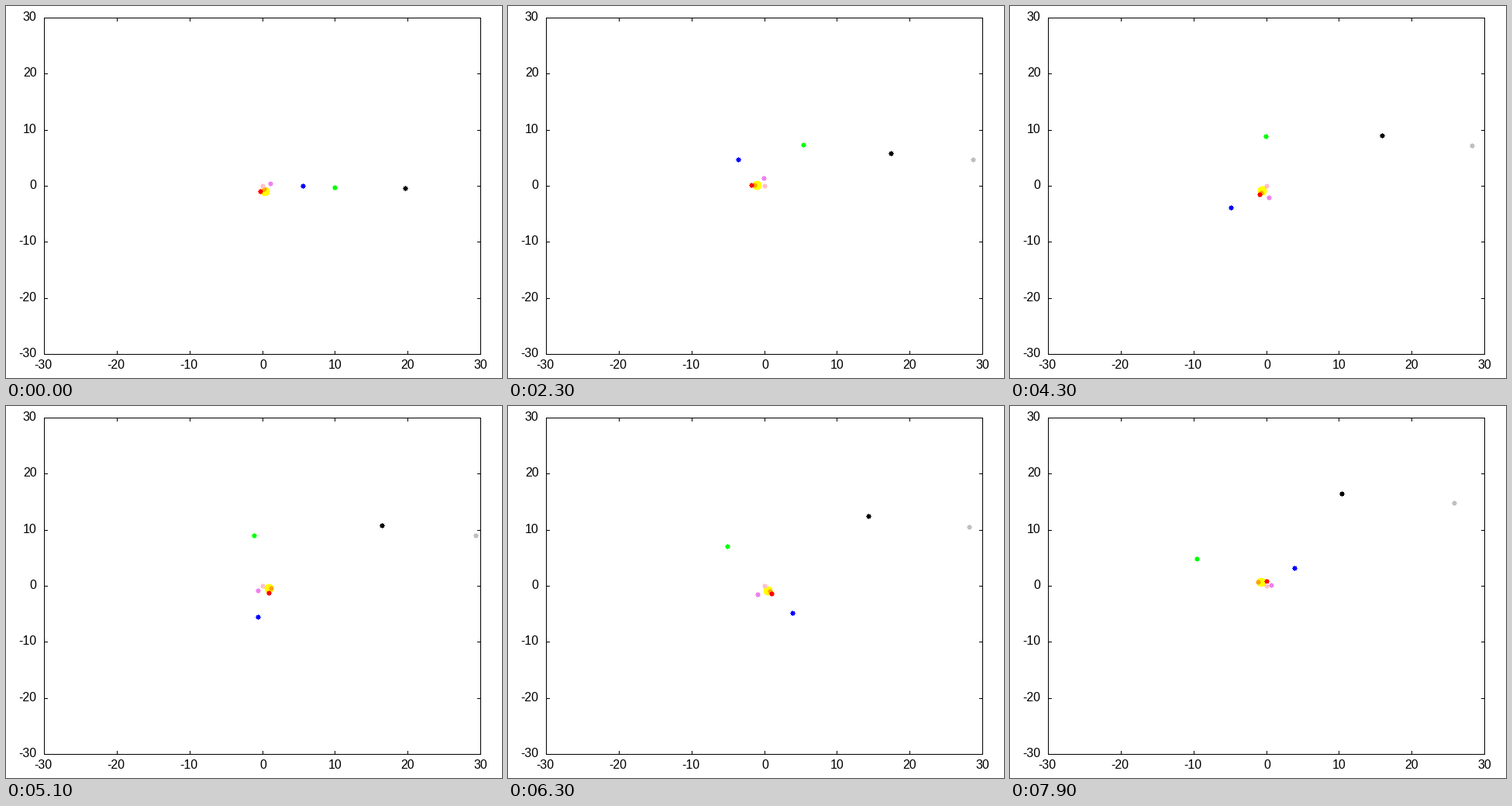
A matplotlib script for the animation above (8 s loop, 640x480 px).

```python
import numpy as np
import matplotlib.pyplot as plt
from matplotlib.animation import FuncAnimation
from matplotlib.patches import Polygon, Rectangle

W, H, DPI = 640, 480, 80
LEFT, RIGHT, TOP, BOTTOM = 49, 612, 15, 449
LIMIT, TICK = 30, 4
FRAMES, START = 80, 2
PX = 72 / DPI  # one pixel in points

SUN_RATE = 57.21  # degrees per step, seen from the fixed centre
# colour, semi-major axis, eccentricity, mean degrees per step
PLANETS = [
    ("#ffa500", 0.387, 0, 237.8),
    ("#ff0000", 0.723, 0, 93.5),
    ("#ffc0cb", 1.0, 0, SUN_RATE),
    ("#ee82ee", 1.515, 0, 30.82),
    ("#0000ff", 5.225, 0.003, 4.797),
    ("#00ff00", 9.65, 0.0115, 1.903),
    ("#000000", 19.22, 0, 0.678),
    ("#c0c0c0", 30.0, 0, 0.344),
]

fig = plt.figure(figsize=(W / DPI, H / DPI), dpi=DPI, facecolor="white")
ax = fig.add_axes([0, 0, 1, 1])
ax.set_xlim(0, W)
ax.set_ylim(H, 0)
ax.axis("off")


def to_px(x, y):
    """Column and row of the pixel that holds a point in plot units."""
    px = LEFT + (x + LIMIT) * (RIGHT - LEFT) / (2 * LIMIT)
    py = BOTTOM - (y + LIMIT) * (BOTTOM - TOP) / (2 * LIMIT)
    return np.floor(px + 0.5), np.floor(py + 0.5)


def bar(x0, y0, x1, y1):
    """One-pixel line covering both end pixels."""
    ax.add_patch(Rectangle((x0, y0), x1 - x0 + 1, y1 - y0 + 1, fc="black",
                           ec="none", lw=0, antialiased=False, zorder=20))


def label(x, y, value, align):
    ax.text(x, y, str(value), family="Liberation Sans", size=16 * PX,
            ha=align, va="baseline", color="black")


def draw_axes():
    for y in (TOP, BOTTOM):
        bar(LEFT, y, RIGHT, y)
    for x in (LEFT, RIGHT):
        bar(x, TOP, x, BOTTOM)
    for v in range(-LIMIT, LIMIT + 1, 10):
        x, y = to_px(v, v)
        bar(x, TOP, x, TOP + TICK)
        bar(x, BOTTOM - TICK, x, BOTTOM)
        bar(LEFT, y, LEFT + TICK, y)
        bar(RIGHT - TICK, y, RIGHT, y)
        label(x + (0.5 if v >= 0 else -1.3), 468, v, "center")
        label(39.5, y + 4, v, "right")


def disc(r):
    """Outline of a hard-edged disc built from whole pixels."""
    rows = [(dy, int(np.sqrt(r * r - dy * dy))) for dy in range(-r, r + 1)]
    right = [(w + 1, dy + k) for dy, w in rows for k in (0, 1)]
    left = [(-w, dy + k) for dy, w in reversed(rows) for k in (1, 0)]
    return np.array(right + left)


def add_disc(shape, color, zorder):
    return ax.add_patch(Polygon(shape, closed=True, fc=color, ec="none", lw=0,
                                antialiased=False, zorder=zorder))


def orbit(a, e, rate, step):
    """Heliocentric position, starting at perihelion on the x axis."""
    m = np.radians(rate * step)
    theta = m + 2 * e * np.sin(m)
    r = a * (1 - e * e) / (1 + e * np.cos(theta))
    return r * np.cos(theta), r * np.sin(theta)


draw_axes()
DOT, SUN = disc(3), disc(6)
sun = add_disc(SUN, "#ffff00", 2)
dots = [add_disc(DOT, color, 3 + i) for i, (color, *_) in enumerate(PLANETS)]


def update(frame):
    step = frame + START
    ex, ey = orbit(1, 0, SUN_RATE, step)
    sun.set_xy(SUN + to_px(-ex, -ey))
    for dot, (_, a, e, rate) in zip(dots, PLANETS):
        x, y = orbit(a, e, rate, step)
        x, y = x - ex, y - ey
        dot.set_xy(DOT + to_px(x, y))
        dot.set_visible(abs(x) <= LIMIT and abs(y) <= LIMIT)
    return [sun, *dots]


anim = FuncAnimation(fig, update, frames=FRAMES, interval=100, repeat=True,
                     repeat_delay=0, blit=False)
plt.show()
```
